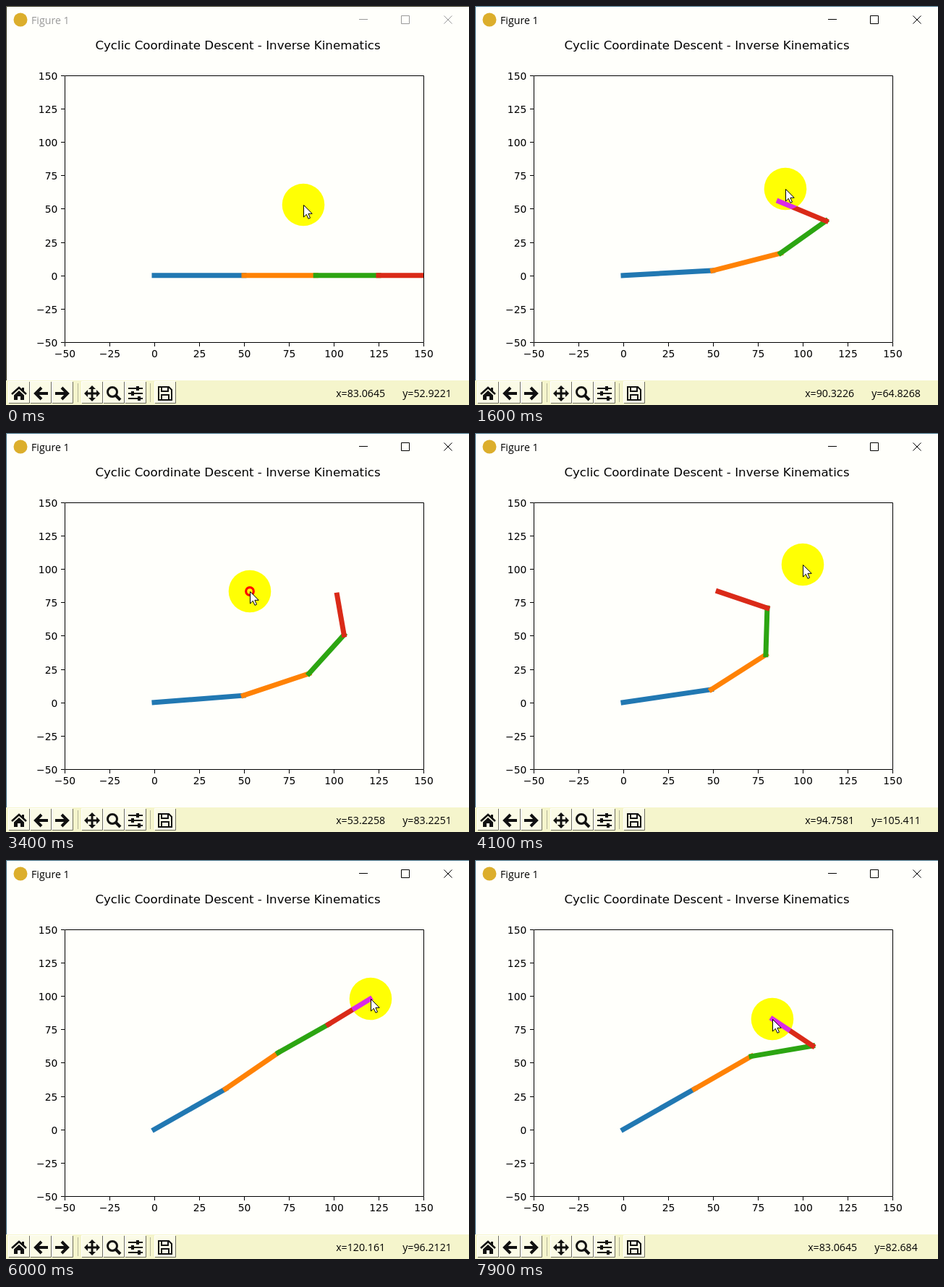
An HTML page that plays this animation: 640 px wide and 552 px high, repeating every 8000 ms.

```html
<!DOCTYPE html>
<html lang="en">
<head>
<meta charset="utf-8">
<title>Inverse kinematics</title>
<style>
html, body { margin: 0; width: 100%; height: 100%; overflow: hidden; background: #fffffb; }
svg { display: block; }
text { white-space: pre; }
.ui { font: 14.2px "Open Sans", sans-serif; }
.plot { font: 13.89px "DejaVu Sans", sans-serif; }
.mid { text-anchor: middle; }
.end { text-anchor: end; }
.icon { fill: none; stroke: #111; }
.solid { fill: #111; stroke: none; }
#halo { fill: #00f; mix-blend-mode: difference; }
</style>
</head>
<body>
<svg width="640" height="552" viewBox="0 0 640 552">
  <defs><clipPath id="axes"><path d="M81 96H578V466H81Z"/></clipPath></defs>
  <rect width="640" height="552" fill="#fffffb"/>
  <path id="frame" d="M.5 552V.5H640" fill="none"/>
  <circle cx="20" cy="19" r="9.5" fill="#dcae2c"/>
  <text id="caption" class="ui" x="35" y="25">Figure 1</text>
  <path id="controls" d="M488 18.5h12M546.5 13.5h11v11h-11zM605.5 13.5l11 11m0-11l-11 11" fill="none"/>
  <text class="plot mid" x="320.5" y="60" style="font-size:16.67px">Cyclic Coordinate Descent - Inverse Kinematics</text>
  <g id="arm" clip-path="url(#axes)" fill="none" stroke-width="7" stroke-linecap="square"></g>
  <path d="M81.5 96.5H577.5V465.5H81.5Z" fill="none" stroke="#000"/>
  <g id="ticks"></g>
  <rect y="518" width="640" height="34" fill="#f5f5cc"/>
  <path d="M99.5 522v26M199.5 522v26" stroke="#b5b59a"/>
  <g id="tools"></g>
  <text id="xText" class="ui" y="541"></text>
  <text id="yText" class="ui" y="541"></text>
  <circle id="halo" r="29.3"/>
  <g id="pointer">
    <circle id="ring" r="5.3" fill="none" stroke="#f00" stroke-width="3.2"/>
    <path d="M.5.5V17L4.3 13.3L7 19.3L9.5 18.2L6.9 12.3H12.2Z" fill="#fff" stroke="#000"/>
  </g>
</svg>
<script>
const el = id => document.getElementById(id);
const LOOP = 8000, STEP = 100, CLICK = 200;
const LENGTHS = [50, 40, 35, 30];
const COLORS = ['#2178b2', '#ff8205', '#2ca512', '#da2a18'];
const toX = x => 205 + x * 2.48;
const toY = y => 372.8 - y * 1.848;

// Solved link angles in degrees; each pose follows a click by CLICK ms.
const POSES = [
  [0, 0, 0, 0, 0],
  [1000, 4.2, 19, 43.7, 150.9],
  [2400, 6, 24.2, 56.1, 97.4],
  [3500, 11.2, 40.6, 88.7, 155.6],
  [5700, 37.4, 42.7, 37.1, 39.4],
  [6800, 37.4, 37.6, 17.3, -107.8],
  [7900, 37.4, 37.6, 13, 138.1]
];

// Pointer path: time, x, y
const PATH = [
  [0, 411, 275], [300, 411, 275], [600, 420, 270], [1000, 420, 270],
  [1200, 429, 253], [1600, 429, 253], [2100, 457, 224], [2500, 457, 224],
  [3100, 308, 209], [3300, 337, 219], [3500, 337, 219], [4000, 440, 178],
  [4300, 480, 190], [4500, 504, 200], [4700, 504, 200], [5200, 503, 195],
  [5900, 503, 195], [6000, 504, 192], [6500, 443, 305], [6900, 443, 305],
  [7000, 445, 305], [7100, 447, 304], [7500, 403, 208], [7700, 411, 220],
  [LOOP, 411, 220]
];

function pointerAt(t) {
  const i = PATH.findIndex(key => key[0] > t);
  const [t0, x0, y0] = PATH[i - 1], [t1, x1, y1] = PATH[i];
  const k = (t - t0) / (t1 - t0);
  return [Math.round(x0 + (x1 - x0) * k), Math.round(y0 + (y1 - y0) * k)];
}

function buildTicks() {
  let out = '';
  for (let v = -50; v <= 150; v += 25) {
    const x = Math.round(toX(v)) + .5, y = Math.floor(toY(v) + .4) + .5;
    const label = String(v).replace('-', '\u2212');
    out += `<path d="M${x} 466v5M76 ${y}h5" stroke="#000"/>
      <text class="plot mid" x="${x}" y="486">${label}</text>
      <text class="plot end" x="71.3" y="${y + 5}">${label}</text>`;
  }
  el('ticks').innerHTML = out;
}

function buildTools() {
  const stroke = (d, width) => `<path class="icon" d="${d}" stroke-width="${width}"/>`;
  const fill = d => `<path class="solid" d="${d}"/>`;
  const arrow = stroke('M10 0H-7M1-8L-7 0L1 8', 4);
  const icons = [
    [18, stroke('M-10 1L0-8L10 1', 2.6) + fill('M-7 2.5L0-4L7 2.5V9H2V4H-2V9H-7ZM4-8h3v6l-3-3z')],
    [48, arrow],
    [78, `<g transform="scale(-1 1)">${arrow}</g>`],
    [119, stroke('M-8 0H8M0-8V8', 3) +
      fill('M0-11l5 5h-10zM0 11l5-5h-10zM-11 0l5-5v10zM11 0l-5-5v10z')],
    [149, '<circle class="icon" cx="-2" cy="-2" r="6.5" stroke-width="3"/>' + stroke('M3 3L9 9', 4)],
    [179, stroke('M-10-7H10M-10 0H10M-10 7H10', 2) + fill('M1-10h4v6h-4zM-6-3h4v6h-4zM3 4h4v6h-4z')],
    [220, stroke('M-9-9H5L9-5V9H-9ZM-5-9V-3H4V-9M-5 9V2H5V9', 2)]
  ];
  el('tools').innerHTML = icons.map(([x, shape]) => `<g transform="translate(${x} 536)">
    <path d="M-14-16H14V13H-14Z" fill="#fbfbe6"/>
    <path d="M-14 13.5H14.5V-16" fill="none" stroke="#6e6e60"/>
    <path d="M-14.5 13V-16.5H14" fill="none" stroke="#fff"/>${shape}</g>`).join('');
}

function drawArm(angles) {
  let x = 0, y = 0;
  LENGTHS.forEach((length, i) => {
    const a = angles[i] * Math.PI / 180;
    const start = `M${toX(x)} ${toY(y)}`;
    x += length * Math.cos(a);
    y += length * Math.sin(a);
    el('arm').children[i].setAttribute('d', `${start}L${toX(x)} ${toY(y)}`);
  });
}

function drawReadout([px, py]) {
  const show = v => Number(v.toPrecision(6));
  const xText = el('xText'), yText = el('yText'), gap = 24;
  xText.textContent = 'x=' + show((px - 205) / 2.48);
  yText.textContent = 'y=' + show((372.8 - py) / 1.848);
  const w = xText.getComputedTextLength();
  const left = 536 - (w + gap + yText.getComputedTextLength()) / 2;
  xText.setAttribute('x', left);
  yText.setAttribute('x', left + w + gap);
}

function draw(t) {
  const focused = t >= 800, ink = focused ? '#000' : '#999';
  el('frame').setAttribute('stroke', focused ? '#3c6a80' : '#33331f');
  el('caption').setAttribute('fill', ink);
  el('controls').setAttribute('stroke', ink);

  drawArm(POSES.findLast(pose => pose[0] <= t).slice(1));
  const clicking = POSES.some(([at]) => t >= at - CLICK && t < at);
  el('ring').setAttribute('visibility', clicking ? 'visible' : 'hidden');

  const place = `translate(${pointerAt(t)})`;
  el('halo').setAttribute('transform', place);
  el('pointer').setAttribute('transform', place);
  drawReadout(pointerAt(Math.max(0, t - STEP))); // the readout trails by one step
}

buildTicks();
buildTools();
el('arm').innerHTML = COLORS.map(c => `<path stroke="${c}"/>`).join('');

const begin = performance.now();
function tick() {
  const t = (performance.now() - begin) % LOOP;
  draw(Math.floor(t / STEP) * STEP);
  requestAnimationFrame(tick);
}
tick();
</script>
</body>
</html>
```
